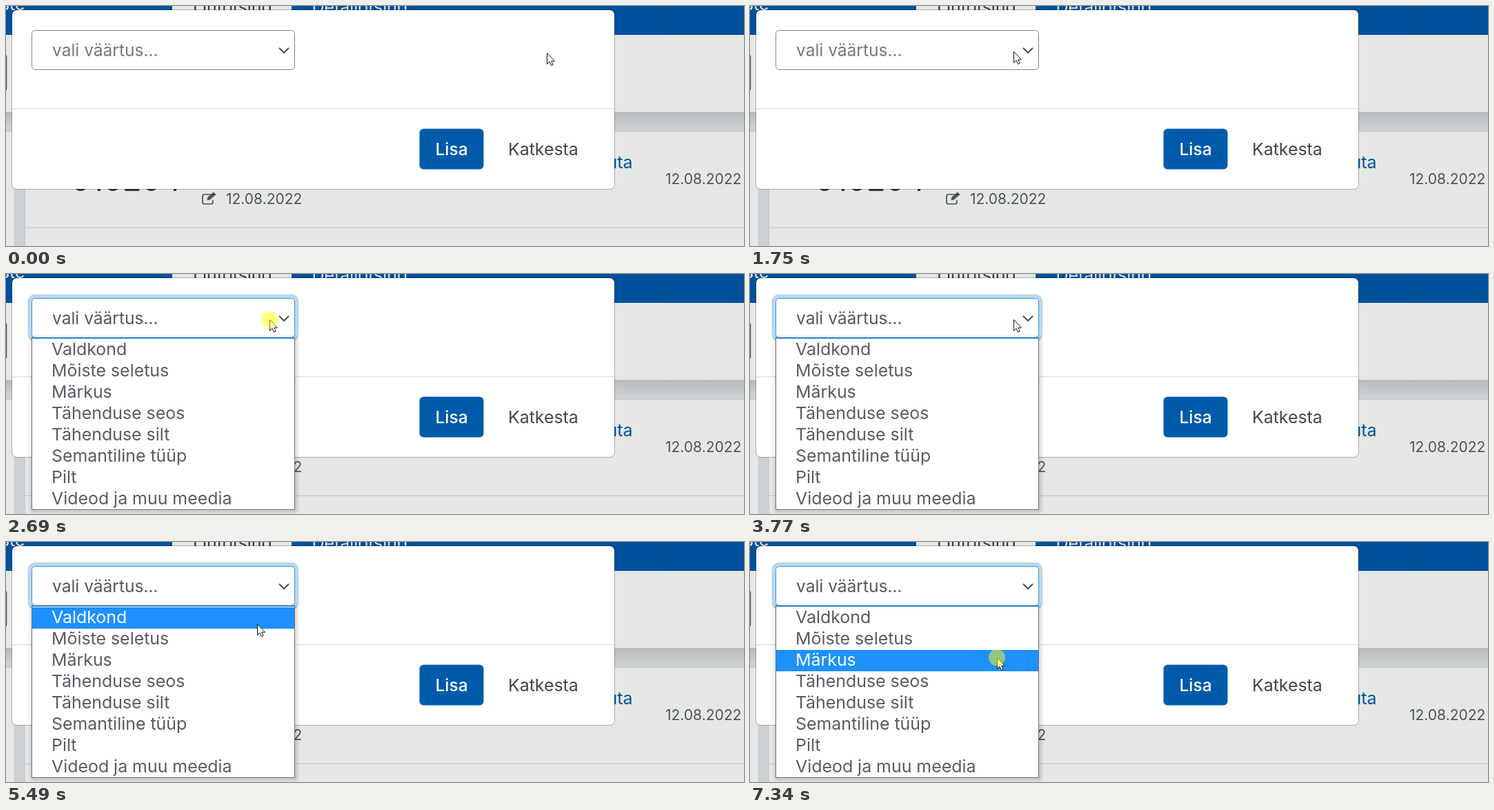
An HTML page for the animation above (8.21 s loop, 1070x349 px).

```html
<!DOCTYPE html>
<html lang="et">
<head>
<meta charset="utf-8">
<title>Dropdown</title>
<style>
html, body { margin: 0; height: 100%; overflow: hidden; background: #e5e7e6; }
svg { display: block; width: 1070px; height: 349px; font: 24.9px Inter, sans-serif; font-optical-sizing: none; }
.small { font-size: 24.5px; }
.date { font-size: 21px; fill: #4f525e; }
</style>
</head>
<body>
<svg viewBox="0 0 1070 349">
  <defs>
    <linearGradient id="shade" x2="0" y2="1">
      <stop stop-color="#b7babb"/><stop offset="1" stop-color="#cdd1d4"/>
    </linearGradient>
    <linearGradient id="veil" x2="0" y2="1">
      <stop stop-opacity=".06"/><stop offset=".15" stop-opacity="0"/>
      <stop offset=".88" stop-opacity="0"/><stop offset="1" stop-opacity=".05"/>
    </linearGradient>
    <filter id="soft"><feGaussianBlur stdDeviation="2.5"/></filter>
  </defs>

  <!-- dimmed page -->
  <rect width="1070" height="349" fill="#e5e7e6"/>
  <rect width="1070" height="42" fill="#00519b"/>
  <path d="M956.5 0V41.5H1070" fill="none" stroke="#004a8e"/>
  <rect x="241" width="173" height="42" fill="#e5e7e6"/>
  <text x="27.5" y="6" text-anchor="end" fill="#e5e7e6">ste</text>
  <text x="271" y="10" fill="#3a3c44">Lihtotsing</text>
  <text x="443.5" y="10" fill="#e5e7e6">Detailotsing</text>
  <rect x="-20" y="69" width="20.5" height="56" rx="5" fill="none" stroke="#4b5566" stroke-width="1.5"/>
  <rect y="154" width="1070" height="195" fill="#cdd1d4"/>
  <rect y="154" width="1070" height="24" fill="url(#shade)"/>
  <path d="M-1 182.5H12.5V350H-1zM27.5 182.5H1071V350H27.5z" fill="#e5e7e6" stroke="#c3c8cc"/>
  <path d="M28 322.5H1070" stroke="#b9c5cd"/>
  <text x="908.5" y="236" text-anchor="end" fill="#00519b">uta</text>
  <text class="date" x="956" y="259">12.08.2022</text>
  <text class="date" x="319" y="288">12.08.2022</text>
  <text x="94" y="269" font-size="45" fill="#33353c">010204</text>
  <g fill="none" stroke="#4f525e" stroke-width="1.7">
    <path d="M298 274H288q-3 0-3 3v8q0 3 3 3h9q3 0 3-3v-3"/>
    <path d="M292 282l1-4 8-7 3 3-8 7z" fill="#4f525e" stroke-width="1"/>
  </g>

  <!-- dialog -->
  <rect x="9" y="6" width="873" height="260" rx="6.5" fill="#fff"/>
  <rect x="8.5" y="5.5" width="874" height="261" rx="7" fill="none" stroke="#000" stroke-opacity=".25"/>
  <path d="M9 149.5H882" stroke="#d5d8da"/>
  <rect x="599.5" y="178.5" width="93" height="59" rx="6" fill="#005aaa"/>
  <text class="small" x="646" y="217" text-anchor="middle" font-weight="500" fill="#fff">Lisa</text>
  <text x="728" y="217" fill="#44464e">Katkesta</text>
  <rect id="ring" x="34.5" y="32.5" width="387" height="63" rx="8" fill="none" stroke="#bfd6ea" stroke-width="6"/>
  <rect id="field" x="37.5" y="35.5" width="381" height="57" rx="5" fill="#fff"/>
  <text id="value" class="small" x="67" y="73">vali väärtus...</text>
  <path d="M396 61l7 7 7-7" fill="none" stroke="#4a4f55" stroke-width="2"/>

  <g id="shadow">
    <path d="M38 94H420V344H38z" fill="none" stroke="#000" stroke-opacity=".28" stroke-width="3" filter="url(#soft)"/>
    <path d="M37 93H419V343H37z" fill="url(#veil)"/>
  </g>
  <g id="menu">
    <path d="M37.5 93.5H418.5V342.5H37.5z" fill="#fff" stroke="#6e7073"/>
    <path d="M37 93H419" stroke="#1e80dc" stroke-width="1.5"/>
    <rect id="bar" x="38" width="380" height="31" fill="#1e90ff"/>
    <g id="items"></g>
  </g>

  <path id="cursor" d="M.5.5v16l3.6-3.4 2.4 5.4 2.6-1.1-2.4-5.2h4.8z" fill="#fff" stroke="#111"/>
  <circle id="click" r="12" fill="#ff0" fill-opacity=".5"/>
</svg>
<script>
const LOOP = 8210;
const $ = id => document.getElementById(id);
const set = (id, attrs) => { for (const k in attrs) $(id).setAttribute(k, attrs[k]); };

$("items").innerHTML = ["Valdkond", "Mõiste seletus", "Märkus", "Tähenduse seos", "Tähenduse silt",
  "Semantiline tüüp", "Pilt", "Videod ja muu meedia"]
  .map((s, i) => `<text x="66" y="${118 + 31 * i}">${s}</text>`).join("");
const items = [...$("items").children];

// runs of evenly spaced steps: [first, last, count]
const toField = [[190, 980, 13], [1050, 1750, 11]];
const toItem = [[4370, 5140, 12], [5210, 5980, 12], [6050, 6610, 9]];

function progress(t, runs) {
  let done = 0, total = 0;
  for (const [a, b, n] of runs) {
    total += n;
    if (t >= a) done += Math.min(n, 1 + Math.floor((t - a) / (b - a) * (n - 1) + 1e-6));
  }
  return done / total;
}
const inOut = p => p < .5 ? 2 * p * p : 1 - 2 * (1 - p) ** 2;
const out = p => 1 - (1 - p) ** 2;

function draw(t) {
  const a = inOut(progress(t, toField)), p = progress(t, toItem);
  const x = Math.round(784 - 402 * a - 24 * out(p));
  const y = Math.round(68 - 2 * a + 102 * (p + inOut(p)) / 2);
  set("cursor", { transform: `translate(${x} ${y})` });

  const pressed = t >= 2480 && t < 3770 || t >= 7340;
  set("click", { cx: x, cy: y, opacity: +pressed });

  const fade = t < 2480 ? 0 : Math.min(3, Math.floor((t - 2480) / 70)) / 3;
  set("menu", { opacity: fade });
  set("ring", { opacity: fade });
  set("shadow", { opacity: +(t >= 2480) });
  set("field", { stroke: fade ? "#2a96f0" : "#788792" });
  set("value", { fill: fade ? "#55565f" : "#73777d" });

  const row = Math.floor((y - 94) / 31);
  set("bar", { y: 94 + 31 * row + (row >= 0), opacity: +(row >= 0) });
  items.forEach((el, i) => el.setAttribute("fill", i === row ? "#fff" : "#595a66"));
}

const start = performance.now();
function tick(now) {
  draw(Math.max(0, now - start) % LOOP);
  requestAnimationFrame(tick);
}
draw(0);
requestAnimationFrame(tick);
</script>
</body>
</html>
```
